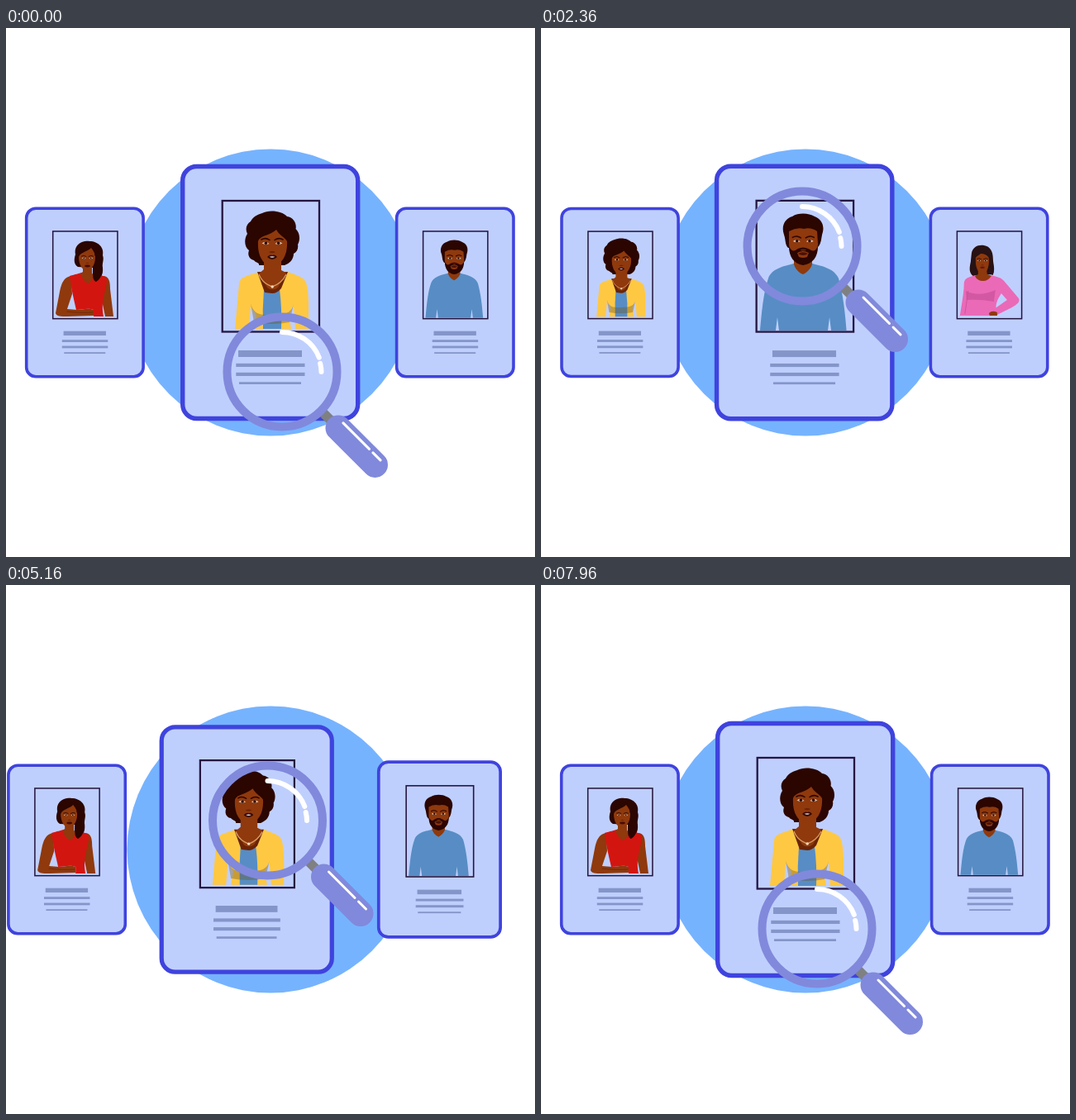
An HTML page that plays this animation: 640x640 px, repeating every 8020 ms.

```html
<!DOCTYPE html>
<html lang="en">
<head>
<meta charset="utf-8">
<title>Profile search</title>
<style>
html, body { margin: 0; width: 100%; height: 100%; overflow: hidden; background: #fff; }
svg { display: block; width: 100%; height: 100%; }
.hair { fill: #2b0500; }
.skin { fill: #8f390d; }
.shade { fill: #6a2406; }
.line { fill: none; stroke: #2b0500; stroke-linecap: round; }
.glint { fill: none; stroke: #fff; stroke-linecap: round; }
</style>
</head>
<body>
<svg viewBox="0 0 640 640">
  <defs>
    <g id="sheet">
      <rect x="213.7" y="167.5" width="212" height="305" rx="17" fill="#bfcffd" stroke="#3f43de" stroke-width="5.4"/>
      <rect x="261.7" y="209" width="117.3" height="158.5" fill="none" stroke="#251642" stroke-width="2.3"/>
      <g fill="#8495c9">
        <rect x="281" y="390" width="77" height="8"/>
        <rect x="278.3" y="405.8" width="83.2" height="4.2"/>
        <rect x="278.3" y="416.8" width="83.2" height="4.2"/>
        <rect x="282" y="428.3" width="75" height="2.7"/>
      </g>
    </g>
    <g id="eyes">
      <path d="M-12.5 0Q-8-3.6-3.5 .4Q-8 2.6-12.5 0M12.5 0Q8-3.6 3.5 .4Q8 2.6 12.5 0" fill="#d9c5b4"/>
      <circle cx="-7.6" cy="-.2" r="1.8" fill="#2b0500"/>
      <circle cx="7.6" cy="-.2" r="1.8" fill="#2b0500"/>
      <path class="line" d="M-13-4.5Q-8-7.5-3-4M13-4.5Q8-7.5 3-4" stroke-width="1.5"/>
      <path d="M-4 10.5Q0 8.6 4 10.5Q0 13-4 10.5" class="shade"/>
    </g>
  </defs>

  <circle cx="320" cy="320" r="173.5" fill="#76b3ff"/>

  <g id="red">
    <use href="#sheet"/>
    <g transform="translate(319.7 320) scale(1.5) translate(-95.4 -320)">
      <path class="hair" d="M84 274C82 262 92 257 101 258C112 258 119 266 117 275C119 281 116 284 117 290C118 300 113 305 108 308C104 303 105 297 105 290L87 289C82 286 82 280 84 274Z"/>
      <path class="skin" d="M79 300C70 301 67 309 65 319L60 345C61 349 66 349 74 349L106 348L106 341C99 338 92 341 86 341L74 340L80 322Z"/>
      <path class="skin" d="M117 300C125 300 126 307 126 316L130 349L120 349L115 325Z"/>
      <path d="M77 300C84 298 88 297 91 296L106 298C112 298 118 299 122 303C122 318 114 327 118 349L106 349L106 341C99 338 92 341 85 341C83 331 80 322 77 300Z" fill="#d31510"/>
      <path class="skin" d="M93 288L104 288L104 297L107 299C105 304 102 308 99 309C95 307 91 301 90 297L93 295Z"/>
      <path class="skin" d="M88 277C90 271 98 271 103 266C106 270 108 273 108 277C108 287 103 293 98 293.500C92 293 88 286 88 277Z"/>
      <path class="hair" d="M107 274C111 281 108 288 106 294C104 301 106 306 109 307C117 302 118 292 115 285C117 278 115 273 111 270Z"/>
      <use href="#eyes" transform="translate(98.500 278.500) scale(.54)"/>
      <ellipse cx="98.500" cy="288" rx="3.300" ry="1.400" fill="#4a0b08"/>
      <path class="line" d="M74 343C82 344 94 345 105 344" stroke-width=".7" opacity=".4"/>
    </g>
  </g>

  <g id="yellow">
    <use href="#sheet"/>
    <path class="hair" d="M310 224C318 219.500 334 221 340 228C348 229 352 237 350.500 243C356 248 356 257 353 262C354 266 352 271 348 273C348 280 343 285 337 287L306 287C307 284 302 284 300 281C294 280 292 274 294 269C288 265 288 255 292 249C289 243 291 237 296 234C299 228 304 226 310 224Z"/>
    <path d="M303 296C290 300 283 302 282 309L277 364L294 364L296 337L303 347L300 364L345 364L342 347L348 336L350 364L366 364C366 340 367 320 363 308C360 301 351 299 341 295Z" fill="#ffc843"/>
    <path d="M312 316L331 316Q334 340 333 364L311 364Q310 340 312 316Z" fill="#578dc4"/>
    <path d="M296 333C300 348 309 347 322 347C336 347 345 346 348 334L343 356Q322 360 300 356Z" fill="#6d5420" opacity=".38"/>
    <path class="shade" d="M304 295L341 295L333 315Q328 321 322 321L313 320Z"/>
    <path class="skin" d="M312 281L333 281L333 293L339 296L329 314Q322 319 316 314L306 297L312 292Z"/>
    <path d="M306 298C310 308 317 311 322 313C328 311 335 306 339 298" fill="none" stroke="#d99b62" stroke-width="1.400"/>
    <circle cx="322.200" cy="313" r="1.700" fill="#f3d8bd"/>
    <path class="skin" d="M305 258C307 251 320 251 327 244C331 251 338 254 340 258C341 273 335 286 322 288.500C309 286 304 273 305 258Z"/>
    <use href="#eyes" x="322" y="260.500"/>
    <path d="M316 277Q320 273.500 322 275Q325 273.500 328 277Q322 283 316 277Z" fill="#350705"/>
    <path d="M318.500 276.700Q322 275.800 325.500 276.700Q322 279 318.500 276.700Z" fill="#eee"/>
  </g>

  <g id="blue">
    <use href="#sheet"/>
    <path d="M307 285C295 288 280 291 276 303C270 320 268 345 266 366L285 366L287 350L289 366L348 366L350 350L352 366L370.500 366C369 345 366 320 361 303C356 291 341 288 329 285Z" fill="#578dc4"/>
    <path class="skin" d="M307 275L329 275L329 286C327 292 322 296 318 298C313 296 309 292 307 286Z"/>
    <path class="hair" d="M300 266C296 262 297 255 295 250C291 239 297 230 305 228C313 223 325 224 332 228C340 231 345 239 341 250C340 255 340 262 335 266Z"/>
    <path class="skin" d="M301 246Q310 241 319 243Q328 241 335 246L336 261C336 272 329 282 318 284C307 282 301 272 301 261Z"/>
    <path class="hair" d="M301 264C306 273 308 269 312 267Q318 264 324 267C329 269 331 273 336 264C336 277 330 285 318 287C307 285 301 277 301 264Z"/>
    <path d="M311 272Q318 268 325 272L323 277Q318 279 313 277Z" class="skin"/>
    <path d="M312 273Q318 269.500 324 273Q318 277 312 273Z" fill="#481009"/>
    <use href="#eyes" x="318.300" y="258"/>
  </g>

  <g id="pink">
    <use href="#sheet"/>
    <g transform="translate(319.7 320) scale(1.5) translate(-543.2 -320)">
      <path d="M522 273C523 265 530 262 537 263C545 264 548 271 548 279C548 285 551 292 548 298L524 300C518 296 520 288 521 283Z" fill="#281214"/>
      <path d="M527 299C520 301 514 302 513 308C513 320 510 334 508 348L553 348L553 343C551 339 551 335 554 328L558 321L565 329L548 341L553 347L571 338C578 334 581 331 579 327L563 308C558 301 552 301 545 299Z" fill="#ea6ab8"/>
      <path d="M515 318Q531 326 551 317L549 331Q532 328 516 329Z" fill="#c84f98" opacity=".65"/>
      <path d="M518 318L514 346" fill="none" stroke="#c84f98" stroke-width=".8"/>
      <path class="skin" d="M543 345Q547 341 553 344L553 348L544 348Z"/>
      <path class="skin" d="M530 291L540 291L541 298L546 300Q542 306 536 306Q529 306 526 300L530 298Z"/>
      <path class="skin" d="M527 278C529 275 531 275 533 273Q540 273 543 278C544 290 540 297 535 298C530 297 526 288 527 278Z"/>
      <use href="#eyes" transform="translate(535.2 281.500) scale(.5)"/>
      <ellipse cx="535.200" cy="289.800" rx="2.800" ry="1.300" fill="#6b1516"/>
      <path d="M523 278C522 287 520 292 523 299L528 298Q526 290 527 280ZM543 277Q544 290 542 297L548 299Q550 290 547 282Z" fill="#281214"/>
    </g>
  </g>

  <g id="lens">
    <path d="M45 45L63 63" stroke="#7f8082" stroke-width="11.500" fill="none"/>
    <circle r="66.500" fill="none" stroke="#8189dc" stroke-width="10"/>
    <path d="M68 68L112.500 112.500" stroke="#8189dc" stroke-width="31" stroke-linecap="round"/>
    <path class="glint" d="M0-48A48 48 0 0 1 44.800-17.200M46.200-10Q47.500-5 47.500 0" stroke-width="6"/>
    <path class="glint" d="M74 62L105.500 93.500M110 98L119 107" stroke-width="3"/>
  </g>
</svg>
<script>
const LOOP = 8020, BACK = 3760, SMALL = .667;
const byId = id => document.getElementById(id);

// Smooth curve through [time, value] points without extra bumps.
function curve(points) {
  const n = points.length - 1;
  const slope = i => (points[i + 1][1] - points[i][1]) / (points[i + 1][0] - points[i][0]);
  const tangent = points.map((_, i) => {
    if (i === 0) return slope(0);
    if (i === n) return slope(n - 1);
    const a = slope(i - 1), b = slope(i);
    return a * b <= 0 ? 0 : 2 * a * b / (a + b);
  });
  return t => {
    if (t <= points[0][0]) return points[0][1];
    if (t >= points[n][0]) return points[n][1];
    let i = 0;
    while (t > points[i + 1][0]) i++;
    const [t0, v0] = points[i], [t1, v1] = points[i + 1];
    const h = t1 - t0, u = (t - t0) / h, w = 1 - u;
    return w * w * (1 + 2 * u) * v0 + u * u * (3 - 2 * u) * v1
      + h * u * w * (w * tangent[i] - u * tangent[i + 1]);
  };
}

const slide = curve([[0, 0], [40, 0], [420, .17], [1400, .915], [1560, 1.045], [1630, 1.066],
  [1850, 1], [2030, .98], [2350, 1.004], [2700, 1]]);
const trail = curve([[0, 0], [40, 0], [420, .084], [1400, .873], [1560, .969], [1720, 1.024],
  [1950, 1], [2130, .99], [2500, 1]]);
const lensX = curve([[0, 334], [1560, 313.5], [3240, 322], [4180, 333.5], [5160, 316.5], [6840, 331], [7960, 334]]);
const lensY = curve([[0, 416], [1560, 251], [3240, 279], [4180, 263], [5160, 285], [6840, 345], [7960, 416]]);

const thereAndBack = (ease, t) => t < BACK ? ease(t) : 1 - ease(t - BACK);

function place(id, x, scale) {
  byId(id).setAttribute('transform', `translate(${x} 320) scale(${scale}) translate(-319.7 -320)`);
}

function draw(t) {
  const p = thereAndBack(slide, t), q = thereAndBack(trail, t), grow = 1 - SMALL;
  place('red', 95.4 - 259 * p, SMALL);
  place('yellow', 319.7 - 225.2 * q, 1 - grow * p);
  place('blue', 543.3 - 223.7 * p, SMALL + grow * p);
  place('pink', 543.2 + 289 * (1 - p), SMALL);
  byId('lens').setAttribute('transform', `translate(${lensX(t)} ${lensY(t)})`);
}

const start = performance.now();
function tick() {
  draw((performance.now() - start) % LOOP);
  requestAnimationFrame(tick);
}
tick();
</script>
</body>
</html>
```
